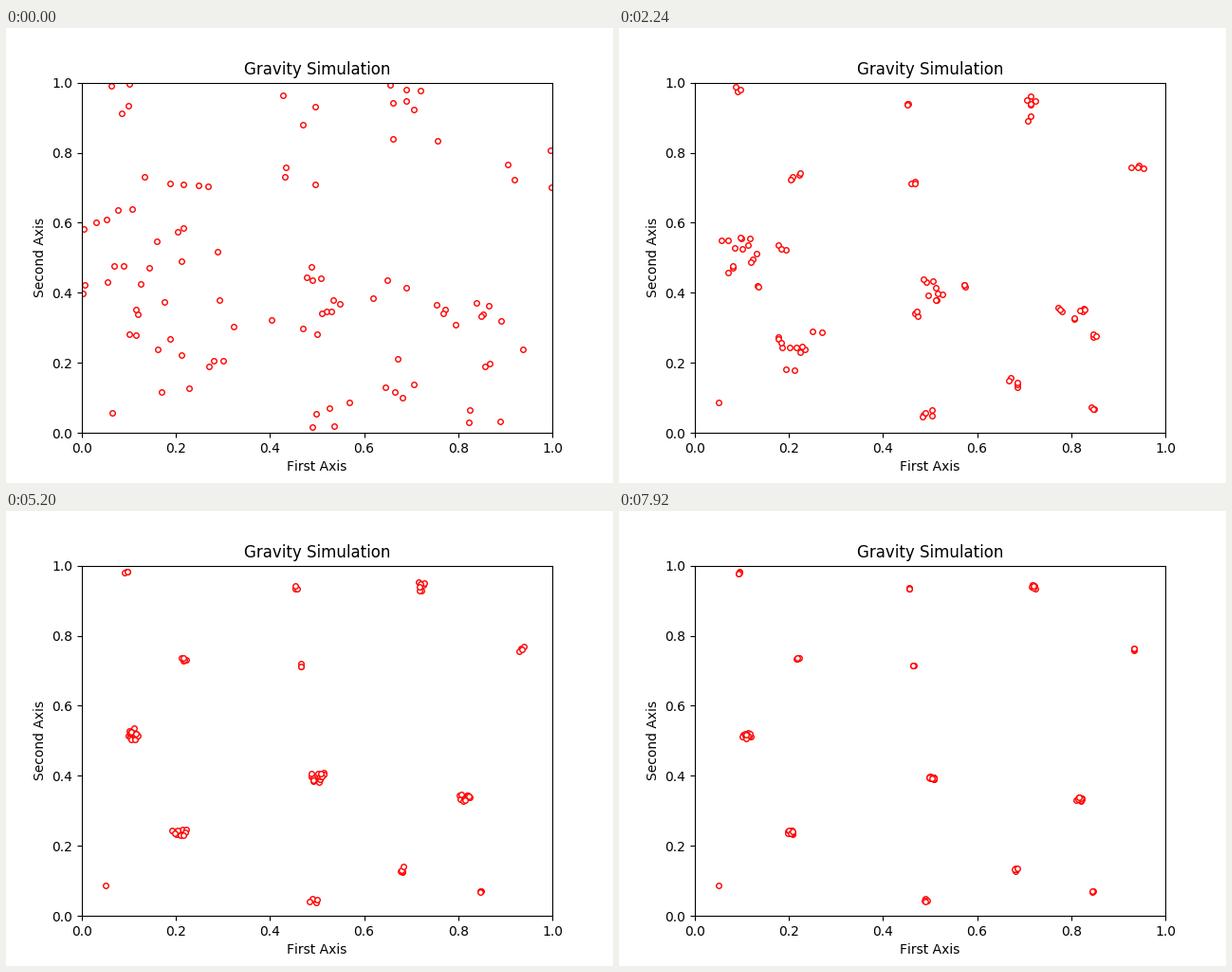
Recreate the animation shown at these times as a matplotlib script. Size 640 by 480 pixels, loop 8000 ms.

```python
import matplotlib.pyplot as plt
import numpy as np
from matplotlib.animation import FuncAnimation

FRAMES, INTERVAL = 100, 80
BACKGROUND = "#fefffe"
GOLDEN_ANGLE = np.pi * (3 - np.sqrt(5))
KNOT_SIZE = 3        # bodies that first fall together
KNOT_TIME = .95      # seconds until they have done so
plt.rcParams.update({"font.family": "DejaVu Sans", "text.kerning_factor": 6})

# Gathering points: x, y, number of bodies
CLUSTERS = [
    (.093, .980, 4), (.455, .935, 3), (.720, .940, 8), (.935, .762, 4),
    (.218, .734, 5), (.465, .715, 3), (.110, .515, 19), (.205, .240, 13),
    (.502, .395, 15), (.817, .335, 12), (.682, .133, 5), (.845, .070, 3),
    (.492, .045, 5), (.050, .087, 1),
]

rng = np.random.default_rng(4)


def polar(radius, angle):
    return np.column_stack((radius * np.cos(angle), radius * np.sin(angle)))


def fold(points):
    """Mirror anything outside the unit square back into it."""
    return 1 - np.abs(1 - np.abs(points))


def scatter_cluster(x, y, size):
    """Final place, first knot and starting place of each body."""
    knots = -(-size // KNOT_SIZE)
    k = np.arange(knots)
    radius = .041 * np.sqrt(size * k / knots)
    turn = rng.uniform(0, 2 * np.pi)
    centres = fold((x, y) + polar(radius, k * GOLDEN_ANGLE + turn))
    knot = centres[np.arange(size) % knots]
    spread = .06 * np.sqrt(rng.uniform(0, 1, size))
    start = fold(knot + polar(spread, rng.uniform(0, 2 * np.pi, size)))
    return np.tile((x, y), (size, 1)), knot, start


home, knot, start = map(
    np.concatenate, zip(*(scatter_cluster(*c) for c in CLUSTERS)))
sizes = np.concatenate([np.full(n, n) for _, _, n in CLUSTERS])
count = len(sizes)

merge_time = 2 + 10 * np.linalg.norm(knot - home, axis=1)
reach = .0075 * np.sqrt(sizes - 1) * rng.uniform(.3, 1, count)
heading, phase = rng.uniform(0, 2 * np.pi, (2, count))
speed = 2 * np.pi / rng.uniform(1.0, 1.8, count)


def ease_in(t, duration, power):
    return (np.clip(t / duration, 0, 1) ** power)[..., None]


def orbit(t):
    """Slim elliptical swings that die down towards the end."""
    along = np.cos(speed * t + phase)
    across = .45 * np.sin(speed * t + phase)
    swing = along + 1j * across
    size = reach * (1 - .65 * (t / 7.92) ** 2)
    return polar(size * np.abs(swing), np.angle(swing) + heading)


def positions(t):
    settle = ease_in(t, KNOT_TIME, 1.5)
    pull = ease_in(t, merge_time, 2)
    gathered = start + (knot - start) * settle
    return gathered + (home - knot) * pull + orbit(t) * settle * (.3 + .7 * pull)


fig, ax = plt.subplots(figsize=(6.4, 4.8), dpi=100, facecolor=BACKGROUND)
ax.set(xlim=(0, 1), ylim=(0, 1), title="Gravity Simulation",
       xlabel="First Axis", ylabel="Second Axis", facecolor=BACKGROUND)
bodies, = ax.plot([], [], "o", ms=4, mfc=BACKGROUND, mec="red", mew=1)


def update(frame):
    bodies.set_data(*positions(frame * INTERVAL / 1000).T)
    return bodies,


animation = FuncAnimation(fig, update, frames=FRAMES, interval=INTERVAL,
                          repeat=True, repeat_delay=0)
plt.show()
```
